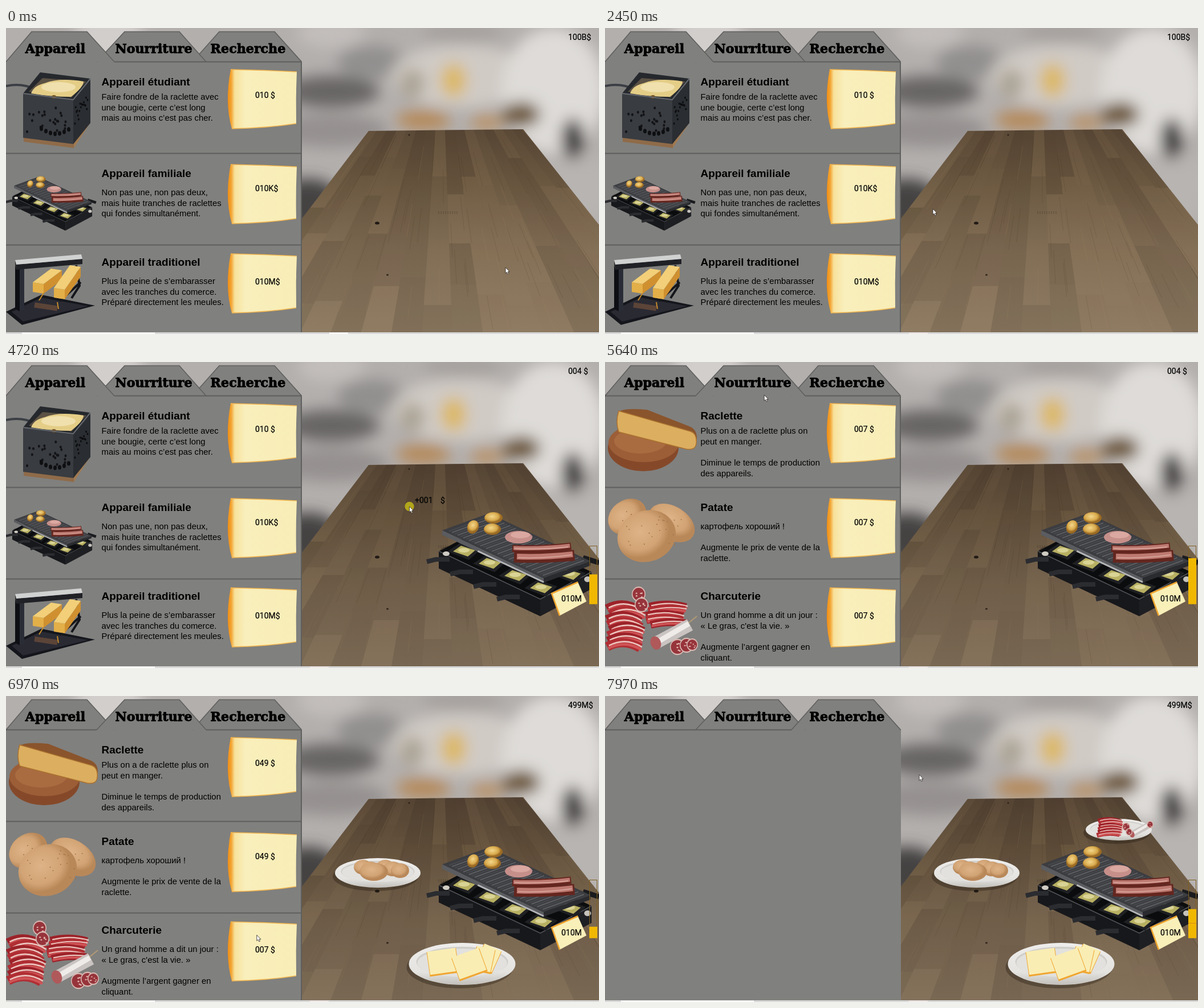
Animation, 1040 px wide and 538 px high, one loop 8 s. Source, as an HTML page:

```html
<!DOCTYPE html>
<html lang="fr">
<head>
<meta charset="utf-8">
<title>Raclette</title>
<style>
html, body { margin: 0; width: 100%; height: 100%; overflow: hidden; background: #80807e; }
svg { display: block; width: 100vw; height: 100vh; }
.tab { font: 700 22.2px "DejaVu Serif", serif; text-anchor: middle; stroke: #000; stroke-width: .9; }
.head { font: 700 19px "Liberation Sans", Arial, sans-serif; }
.body { font: 14.9px "Liberation Sans", Arial, sans-serif; }
.num { font: 14px Roboto, sans-serif; white-space: pre; stroke: #000; stroke-width: .2; }
</style>
</head>
<body>
<svg id="stage" viewBox="0 0 1040 538" preserveAspectRatio="none"></svg>
<script>
const LOOP = 8000;
const EDGE = '#5f5f5e', PANEL = '#80807e';

const poly = (pts, fill, more = '') => `<polygon points="${pts}" fill="${fill}" ${more}/>`;
const oval = (x, y, rx, ry, fill, more = '') =>
  `<ellipse cx="${x}" cy="${y}" rx="${rx}" ry="${ry}" fill="${fill}" ${more}/>`;
const rect = (x, y, w, h, fill, more = '') =>
  `<rect x="${x}" y="${y}" width="${w}" height="${h}" fill="${fill}" ${more}/>`;
const path = (d, fill, more = '') => `<path d="${d}" fill="${fill}" ${more}/>`;
const line = (d, color, w, more = '') => path(d, 'none', `stroke="${color}" stroke-width="${w}" ${more}`);
const text = (x, y, cls, s, id = '') => `<text x="${x}" y="${y}" class="${cls}" ${id && `id="${id}"`}>${s}</text>`;
const group = (id, s) => `<g id="${id}">${s}</g>`;
const turn = (a, x, y) => `transform="rotate(${a} ${x} ${y})"`;
const mix = (a, b, k) => a + (b - a) * k;
const times = (n, fn) => Array.from({ length: n }, (_, i) => fn(i)).join('');

let seed = 7;
const rnd = () => (seed = (seed * 16807) % 2147483647) / 2147483647;
const near = (c, r) => c + (rnd() * 2 - 1) * r;

// A slanted block: corner p, front edge a, side edge b, height h
function block([x, y], [ax, ay], [bx, by], h, top, front, side) {
  const fx = x + ax, fy = y + ay, rx = fx + bx, ry = fy + by;
  return poly([x, y, fx, fy, fx, fy + h, x, y + h], front) +
    poly([fx, fy, rx, ry, rx, ry + h, fx, fy + h], side) +
    poly([x, y, fx, fy, rx, ry, x + bx, y + by], top);
}

const stops = list => list.map(([at, c]) => `<stop offset="${at}" stop-color="${c}"/>`).join('');
const radial = (id, a, b, c) =>
  `<radialGradient id="${id}" cx=".42" cy=".38">${stops([[0, a], [.7, b], [1, c]])}</radialGradient>`;

const defs = `<defs>
<filter id="soft" x="-20%" y="-20%" width="140%" height="140%"><feGaussianBlur stdDeviation="13"/></filter>
<linearGradient id="wood" gradientUnits="userSpaceOnUse" x1="0" y1="178" x2="0" y2="535">
${stops([[0, '#584735'], [.25, '#68563f'], [.6, '#7f6c54'], [1, '#8c7a62']])}</linearGradient>
<linearGradient id="slice">${stops([[0, '#f08d14'], [.05, '#f3a432'], [.1, '#f8e19b'], [.25, '#f9efbc'], [1, '#f8edb6']])}</linearGradient>
<linearGradient id="dish" x2="0" y2="1">${stops([[0, '#eeedeb'], [.7, '#e4e3e0'], [1, '#c2bfba']])}</linearGradient>
${radial('spud', '#deb387', '#d2a475', '#b98859')}${radial('fried', '#f3d78c', '#d8a94c', '#9a6a24')}
<clipPath id="top"><polygon points="636,181 907,178 1040,346 1040,535 519,535 519,335"/></clipPath>
</defs>`;

// Blurred kitchen: centre, radii, colour
const blobs = [
  [570, 8, 60, 28, '#c2bebc'], [640, 60, 60, 30, '#92908f'], [570, 112, 85, 28, '#686565'], [570, 180, 100, 30, '#959190'],
  [530, 310, 60, 45, '#454342'], [800, 85, 125, 55, '#d0cbc5'], [960, 110, 90, 110, '#dedbd8'], [1000, 280, 70, 60, '#b7b4b1'],
  [800, 8, 70, 18, '#a5a09d'], [712, 98, 22, 26, '#aaa394'], [785, 92, 22, 30, '#dcb865'], [732, 162, 48, 18, '#b58a5c'],
  [842, 166, 28, 14, '#b99267'], [903, 152, 34, 22, '#6d5739'], [994, 195, 20, 36, '#3d3b3b']
];
const room = () => rect(0, 0, 1040, 538, '#b3afad') +
  `<g filter="url(#soft)">${oval(180, 20, 60, 60, '#d2cecc')}${blobs.map(b => oval(...b)).join('')}</g>`;

// Planks run towards a single vanishing point.
function table() {
  const at = (x, y) => `${(764 + (x - 764) * (y - 14) / 166).toFixed(1)},${y.toFixed(1)}`;
  let s = rect(510, 170, 530, 370, 'url(#wood)');
  for (let a = 634; a < 910; a += 17) {
    for (let y = 175, end; y < 540; y = end) {
      end = y + 40 + rnd() * (y - 70);
      s += poly([at(a, y), at(a + 17, y), at(a + 17, end), at(a, end)], rnd() < .5 ? '#bd9c74' : '#32241a',
        `opacity="${(.02 + rnd() * .1).toFixed(2)}"`);
    }
  }
  s += times(80, () => {
    const x = near(771, 137), y = near(330, 150);
    return line(`M${at(x, y)}L${at(x, y + 60)}`, rnd() < .6 ? '#35230f' : '#b8946c', .8, 'opacity=".18"');
  });
  s += oval(651, 343, 4, 2.5, '#211b16') + oval(707, 188, 1.5, 1.5, '#2b2119') + oval(669, 434, 2, 1.5, '#30251b') +
    times(9, i => line(`M${759 + i * 4} 322v5`, '#4f3d2d', 1, 'opacity=".6"'));
  return `<g clip-path="url(#top)">${s}${group('dim', rect(510, 170, 530, 370, '#201a18', 'opacity=".1"'))}</g>`;
}

function grill() {
  const a = [178, 84], b = [82, -30];
  const on = (u, v) => [765 + u * a[0] + v * b[0], 296 + u * a[1] + v * b[1]];
  const span = (u, v, u2, v2) => `M${on(u, v)}L${on(u2, v2)}`;
  const pan = (x, y) => poly([x - 29, y, x - 6, y - 15, x + 29, y - 3, x + 9, y + 15], '#1f2023') +
    poly([x - 19, y, x - 5, y - 10, x + 20, y - 2, x + 7, y + 9], '#b8b062') + oval(x, y - 2, 10, 4, '#d9d395');
  const bacon = v => line(span(.56, v, .9, v + .42), '#64261f', 17) + line(span(.57, v + .03, .89, v + .42), '#b8746b', 9) +
    line(span(.58, v + .07, .88, v + .43), '#d9a59c', 1.5);
  return oval(850, 372, 98, 30, '#1b1510', `opacity=".4" ${turn(24, 850, 372)}`) +
    block([759, 333], a, [90, -48], 30, '#0b0c0e', '#17181b', '#1e1f23') +
    line('M760 333l177 84l90-48', '#54555a', 1.5) + pan(988, 374) +
    times(4, i => pan(803 + i * 45, 333 + i * 21.5) +
      line(`M${738 + i * 41} ${351 + i * 22}l16-4h24`, '#2b2c30', 8)) +
    oval(772, 337, 6, 4, '#d0ccc3') + oval(1020, 382, 6, 5, '#c5c2bb') + line('M1012 344l28 9', '#1a1b1e', 9) +
    block(on(0, 0), a, b, 8, '#3c3d41', '#5a5c60', '#2a2b2f') + line(`M${on(.35, 0)}m0 7l${a[0] * .65} ${a[1] * .65}`, '#b4b5b7', 3) +
    times(34, i => line(span(.04 + i * .028, .06, .04 + i * .028, .94), i % 2 ? '#5d5e62' : '#47484c', 2)) +
    oval(819, 290, 10, 12, 'url(#fried)', turn(25, 819, 290)) + oval(853, 294, 15, 10, 'url(#fried)') +
    oval(855, 274, 16, 10, 'url(#fried)') + oval(899, 308, 24, 11, '#c68f8a') + oval(902, 304, 17, 6, '#daa8a0') +
    line('M888 328q50 2 103-4', '#64261f', 13) + line('M890 327q50 2 99-4', '#bd7a71', 7) +
    line('M891 343q50 2 106-3', '#64261f', 19) + line('M896 342q45 2 98-4', '#bd7a71', 10) +
    line('M892 328q50 2 94-3m-88 19q45 2 94-5', '#dcaaa2', 1.5);
}

const wedge = y => path('M394 73q60 1 116 4q-2 46-1 91q-52 8-113 9q-13-46-2-104z', 'url(#slice)', `transform="translate(0 ${y})"`) +
  line(`M394 ${73 + y}q60 1 116 4m-1 91q-52 8-113 9`, '#f2b650', 1.3);

function studentOven() {
  const a = [88, 11], b = [30, -37];
  return line('M0 102q28-6 52 6', '#3b3f45', 4) +
    block([31, 192], a, [26, -40], 8, '#6b4d34', '#8f6b49', '#a17a52') +
    block([30, 115], a, b, 78, '#25282c', '#393c41', '#2a2d31') +
    poly('40,112 64,88 141,94 115,122', '#5b5144') +
    path('M44 115q5-14 24-18q26-10 68-3q0 10-22 27q-36 0-70-6z', '#e4cd86') +
    oval(92, 104, 30, 9, '#f0e0ad') + oval(84, 121, 4, 3, '#70512a') + line('M30 115l88 11l30-37', '#666a70', 2) +
    times(24, () => oval(near(73, 36), near(162, 24), 2, 2.5, '#131417')) +
    times(7, i => oval(62 + i * 8, 177 + Math.sin(i / 2) * 9, 3, 4, '#0e0f11')) +
    times(18, i => oval(121 + i * 1.3, near(155 - i * 1.6, 16), 1.4, 2, '#0c0d0f'));
}

function halfWheelOven() {
  const cheese = (p, b) => block(p, [19, 3], b, 17, '#f2cf78', '#e3af48', '#d0902f');
  return poly('0,499 62,469 156,488 28,522', '#14161c') + poly('10,499 62,474 144,489 30,516', '#2a2a33') +
    line('M50 487l40 6', '#5b4438', 9) +
    block([16, 412], [8, 4], [8, -2], 82, '#222', '#0d0f14', '#2b2d36') +
    block([16, 408], [2, 8], [116, -10], 9, '#d0d1d1', '#333', '#202126') +
    line('M94 480l37-33m-8-30l6 36l-14 22', '#15161b', 4) +
    cheese([47, 447], [32, -24]) + cheese([84, 457], [28, -40]) + line('M90 482l2 12m-26-28l-8 13', '#c28a2c', 2);
}

const wheels = oval(67, 151, 62, 41, '#85492a') + oval(68, 142, 62, 34, '#9c5e37') + oval(62, 139, 46, 22, '#a96c41') +
  path('M22 88q12-8 52-4l76 30q12 6 11 22l-137-46z', '#8a542c') +
  path('M24 86l126 36q12 4 10 22-2 12-18 9L24 123q-6-18 0-37z', '#dcae60', 'stroke="#a9712f" stroke-width="1.5"');

const spuds = () => oval(117, 283, 44, 29, 'url(#spud)', turn(32, 117, 283)) + oval(39, 272, 36, 29, 'url(#spud)', turn(-38, 39, 272)) +
  oval(73, 306, 52, 45, 'url(#spud)', turn(-20, 73, 306)) +
  times(26, () => oval(near(82, 52), near(295, 32), 1.1, .9, '#a4744a'));

const salami = (x, y, r) => oval(x, y, r, r * 1.1, '#d9b9b2') + oval(x, y, r - 1.5, r - 1, '#97343b') +
  times(6, () => oval(near(x, r * .6), near(y, r * .6), r * .13, r * .1, '#e0b4ac'));

// Folded slices of ham, stacked downwards
const ham = (x, y, w, h, n) => times(n, i => {
  const px = x + near(0, w * .08), py = y + i * h / n, q = `q${w * .5} ${-h * .2} ${w} ${near(0, h * .06)}`;
  const t = h / n;
  return line(`M${px} ${py}${q}`, i % 2 ? '#b02e33' : '#9c2229', t * 1.7) +
    line(`M${px + 2} ${py + t * .3}${q}`, '#cf5355', t * .5) + line(`M${px + 3} ${py - t * .2}${q}`, '#ecc4bd', t * .28);
});

const sausage = (x, y, k) => line(`M${x} ${y}l${60 * k} ${-32 * k}`, '#c9c3c1', 22 * k) +
  line(`M${x} ${y}l${58 * k} ${-34 * k}`, '#eeebe8', 9 * k) + oval(x, y, 9 * k, 12 * k, '#b0595a', turn(-20, x, y));

const meats = () => ham(8, 434, 58, 76, 8) + ham(76, 430, 64, 40, 5) + salami(59, 408, 12) + salami(64, 427, 12) +
  line('M145 460l16-13', '#b39b73', 2) + sausage(89, 494, 1) + salami(127, 501, 13) + salami(143, 498, 12) + salami(153, 497, 10);

const dish = (x, y, rx, ry) => oval(x - 4, y + 6, rx, ry, '#1d150e', 'opacity=".35"') + oval(x, y, rx, ry, 'url(#dish)') +
  oval(x, y - ry * .1, rx * .86, ry * .72, '#d0cecb') + oval(x, y - ry * .05, rx * .84, ry * .67, '#e2e1de');

const cheeseDish = () => dish(800, 471, 93.5, 37) +
  [[846, 460, 24], [838, 462, 12], [766, 466, -8], [812, 470, -20]].map(([x, y, a]) => {
    const w = a < 0 ? 52 : 34, spin = turn(a, x, y);
    return rect(x - w / 2, y - 19, w, 43, '#f0a631', spin) + rect(x - w / 2 + 1, y - 20, w - 2, 41, '#f9edb4', spin);
  }).join('');

const spudDish = () => dish(652, 311, 75, 26) +
  times(6, i => oval(626 + i * 13, 301 + i % 3 * 3, 16, 13, 'url(#spud)')) + oval(645, 309, 25, 16, 'url(#spud)');

const meatDish = () => dish(901, 235, 58, 19) + ham(864, 220, 40, 30, 6) + sausage(924, 243, .5) +
  salami(914, 230, 7) + salami(956, 226, 6) + salami(919, 239, 6);

const heads = [101, 261.5, 417.5], firsts = [126, 294, 450];
const rows = list => list.map(([head, ...lines], r) => text(167.5, heads[r], 'head', head) +
  lines.map((s, i) => text(167.5, firsts[r] + i * 18.7, 'body', s)).join('')).join('');

const page0 = rows([
  ['Appareil étudiant', 'Faire fondre de la raclette avec', 'une bougie, certe c’est long', 'mais au moins c’est pas cher.'],
  ['Appareil familiale', 'Non pas une, non pas deux,', 'mais huite tranches de raclettes', 'qui fondes simultanément.'],
  ['Appareil traditionel', 'Plus la peine de s’embarasser', 'avec les tranches du comerce.', 'Préparé directement les meules.']
]);
const page1 = rows([
  ['Raclette', 'Plus on a de raclette plus on', 'peut en manger.', '', 'Diminue le temps de production', 'des appareils.'],
  ['Patate', 'картофель хороший !', '', 'Augmente le prix de vente de la', 'raclette.'],
  ['Charcuterie', 'Un grand homme a dit un jour :', '« Le gras, c\'est la vie. »', '', 'Augmente l’argent gagner en', 'cliquant.']
]);

// Tabs overlap; the open one lies in front and has no line below it.
const edges = [[0, 45, 142, 190], [159, 208, 304, 351], [327, 374, 471, 518.5]];
const names = ['Appareil', 'Nourriture', 'Recherche'];
function tabs(open) {
  const shape = ([a, b, c, d]) => path(`M${a} 59.5L${b} 6.5H${c}L${d} 59.5`, PANEL, `stroke="${EDGE}" stroke-width="1.6"`);
  const order = [[2, 1, 0], [0, 2, 1], [0, 1, 2]][open];
  const [a, , , d] = edges[open];
  return order.map(i => shape(edges[i])).join('') + line(`M0 59.5H${a}M${d} 59.5H518`, EDGE, 1.8) +
    names.map((s, i) => text(86.5 + i * 169 + i % 2 * 3.5, 43.5, 'tab', s)).join('');
}

const shop = rect(0, 59, 519, 476, PANEL) +
  group('list', line('M0 220.5H518M0 381.5H518M518 60V535', EDGE, 2) + [0, 167, 324].map(wedge).join('') +
    group('page0', page0 + studentOven() + '<use href="#grill" transform="translate(-386 122.4) scale(.523)"/>' + halfWheelOven()) +
    group('page1', page1 + wheels + spuds() + meats()) +
    times(3, i => text(437, 123 + i * 164, 'num', '', 'price' + i)));

document.getElementById('stage').innerHTML = defs + room() + table() +
  group('meatDish', meatDish()) + group('spudDish', spudDish()) + group('cheeseDish', cheeseDish()) +
  group('device', group('grill', grill()) +
    poly('957,407 1003,387 1018,421 971,446', '#f8efb9') + line('M1003 387L957 407L971 446', '#f0a52e', 2.5) +
    text(974, 421, 'num', '010M') +
    rect(1023.5, 323.5, 13, 101.5, 'none', 'stroke="#80601f"') + rect(1023, 424, 14, 1.5, '#eeb502') +
    '<rect id="fill" x="1023" width="14" fill="#f1b802"/>' + group('tick', line('M1023 399.5h14', '#d98d18', 1))) +
  shop + times(3, i => group('tabs' + i, tabs(i))) +
  text(986, 21, 'num', '', 'cash') +
  group('gain', text(717, 248, 'num', '+001') + text(762, 248, 'num', '$')) +
  '<circle id="ring" cx="707.5" cy="254" fill="#bdb019"/>' +
  rect(0, 535, 1040, 3, '#d8d8d8') + rect(28, 535.5, 233, 2.5, '#fff') + rect(567, 535.5, 33, 2.5, '#fff', 'id="thumb"') +
  path('M0 0V10.2L2.3 8.2L4 11.7L5.7 10.9L4.2 7.5H7.2Z', '#fff', 'id="cursor" stroke="#2a2420" stroke-width=".8"');

const $ = id => document.getElementById(id);
const show = (id, on) => { $(id).style.display = on ? '' : 'none'; };
const put = (id, s) => { if ($(id).textContent !== s) $(id).textContent = s; };

// Cursor stops: time, x, y
const trail = [
  [70, 876, 421], [480, 533, 267], [830, 676, 328], [1140, 650, 315], [1440, 651, 319], [1700, 692, 354], [2000, 596, 340],
  [2220, 646, 326], [2309, 646, 326], [2310, 575, 318], [2450, 575, 318], [2770, 472, 306], [3040, 470, 302],
  [3630, 458, 403.5], [3780, 447, 410], [4640, 707.5, 254], [4760, 707.5, 254], [5420, 233, 32], [6150, 445, 151],
  [6330, 445, 151], [6640, 437, 287], [7040, 440, 432], [7620, 423, 16], [7740, 423, 16], [LOOP, 556, 143]
];
function cursorAt(t) {
  const i = Math.max(1, trail.findIndex(p => p[0] > t));
  const [t0, x0, y0] = trail[i - 1], [t1, x1, y1] = trail[i];
  const k = Math.max(0, (t - t0) / (t1 - t0)), e = k * k * (3 - 2 * k);
  return [mix(x0, x1, e), mix(y0, y1, e)];
}

const BUY = 3040, FULL = 3290, CLICK = 4645, FOOD = 5500, RESEARCH = 7740;
const orders = [6150, 6660, 7050];
const cash = [[orders[1], '499M$'], [5900, '500M$'], [CLICK, '004 $'], [BUY, '003 $'], [0, '100B$']];

function draw(t) {
  const open = t < FOOD ? 0 : t < RESEARCH ? 1 : 2;
  for (let i = 0; i < 3; i++) show('tabs' + i, i === open);
  show('list', open < 2);
  show('page0', open === 0);
  show('page1', open === 1);
  ['cheeseDish', 'spudDish', 'meatDish'].forEach((id, i) => {
    const bought = t >= orders[i];
    show(id, bought);
    put('price' + i, open ? (bought ? '049 $' : '007 $') : ['010 $', '010K$', '010M$'][i]);
  });
  put('cash', cash.find(c => t >= c[0])[1]);

  const owned = t >= BUY;
  show('device', owned);
  show('dim', owned);
  const h = owned ? ((t - BUY) % FULL) / FULL * 102 : 0;
  $('fill').setAttribute('y', 425.5 - h);
  $('fill').setAttribute('height', h);
  show('tick', t >= BUY + FULL && h > 26);

  const age = t - CLICK;
  show('ring', age >= 0 && age < 300);
  show('gain', age >= 0 && age < 480);
  $('ring').setAttribute('r', Math.max(0, Math.min(9, 6 + age / 35)));
  $('ring').setAttribute('opacity', Math.max(0, Math.min(.92, 1.2 - age / 250)));
  $('gain').setAttribute('transform', `translate(0 ${(75 - age) * .025})`);

  $('thumb').setAttribute('x', t < 480 ? 567 : 533);
  $('thumb').setAttribute('fill', t < 480 ? '#fff' : '#eee7e6');
  const [x, y] = cursorAt(t);
  $('cursor').setAttribute('transform', `translate(${x.toFixed(1)} ${y.toFixed(1)})`);
}

let start;
function tick(now) {
  if (start === undefined) start = now;
  draw((now - start) % LOOP);
  requestAnimationFrame(tick);
}
draw(0);
requestAnimationFrame(tick);
</script>
</body>
</html>
```
